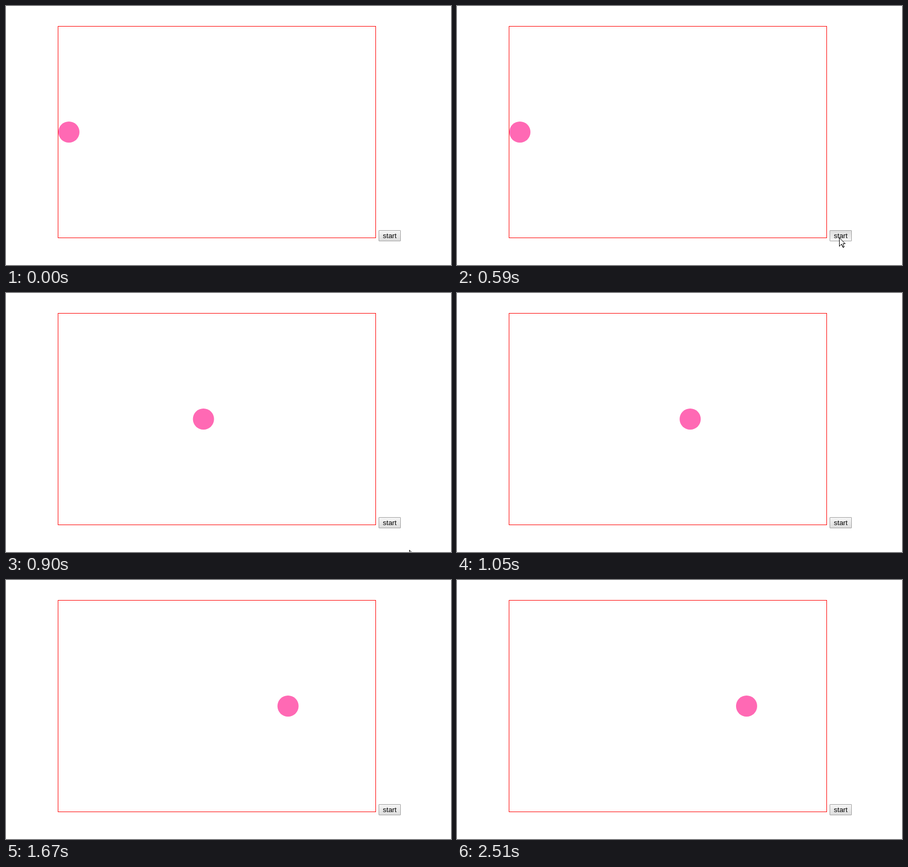
An HTML page for the animation above (2.6 s loop, 842 by 491 pixels).

```html
<!DOCTYPE html>
<html lang="en">
<head>
<meta charset="utf-8">
<title>Easing ball</title>
<style>
  html, body { margin: 0; width: 100%; height: 100%; overflow: hidden; background: #fff; }
  svg { position: absolute; left: 0; top: 0; }
  #button {
    position: absolute; left: 705px; top: 425px; width: 42px; height: 21px;
    box-sizing: border-box; border: 1px solid #a0a0a0; border-radius: 1px;
    background: linear-gradient(#f6f6f6, #ddd); color: #000; text-align: center;
    font: 13.333px/19px "Liberation Sans", Arial, sans-serif;
  }
  #button.pressed { background: linear-gradient(#ddd, #f6f6f6); }
</style>
</head>
<body>
<div id="button">start</div>
<svg width="842" height="491">
  <rect x="98.5" y="38.5" width="601" height="401" fill="none" stroke="red"/>
  <circle id="ball" cx="119" cy="239" r="20" fill="#ff69b4"/>
  <path id="cursor" d="M.5 .5V16.5L4.5 12.5 7.5 18.5 9.5 17.5 7.5 11.5H11.5Z"
    fill="#fff" stroke="#000" stroke-linejoin="round" shape-rendering="crispEdges" visibility="hidden"/>
</svg>
<script>
const LOOP = 2600, LEAD = 130, STEP = 76.6;
const ARRIVE = 6, PRESS = 7, GONE = 12;
const START = 119, TRAVEL = 430, FIRST_GAP = 363.9, KEEP = 0.784;

const [ball, button, cursor] =
  ["ball", "button", "cursor"].map(id => document.getElementById(id));

// The ball closes a fixed share of the remaining distance on every step
function ballX(step) {
  if (step <= PRESS) return START;
  return START + TRAVEL - FIRST_GAP * KEEP ** (step - PRESS - 1);
}

// The cursor slows down onto the button, then speeds away to the lower right
function cursorTip(step) {
  const before = Math.max(0, ARRIVE - step);
  const after = Math.max(0, step - PRESS);
  return [
    723 + 0.72 * before ** 2 + 3 * after + 1.75 * after ** 2,
    439 + 1.8 * before ** 2 + 8 * after + after ** 2
  ].map(Math.round);
}

function draw(now) {
  const t = now % LOOP;
  const step = Math.max(0, 1 + Math.floor((t - LEAD) / STEP));
  const shown = step > 0 && step < GONE;

  ball.setAttribute("cx", ballX(step).toFixed(2));
  button.classList.toggle("pressed", step === PRESS);
  cursor.setAttribute("visibility", shown ? "visible" : "hidden");
  cursor.setAttribute("transform", `translate(${cursorTip(step)})`);
}

let origin;
function tick(now) {
  origin ??= now;
  draw(now - origin);
  requestAnimationFrame(tick);
}
requestAnimationFrame(tick);
</script>
</body>
</html>
```
